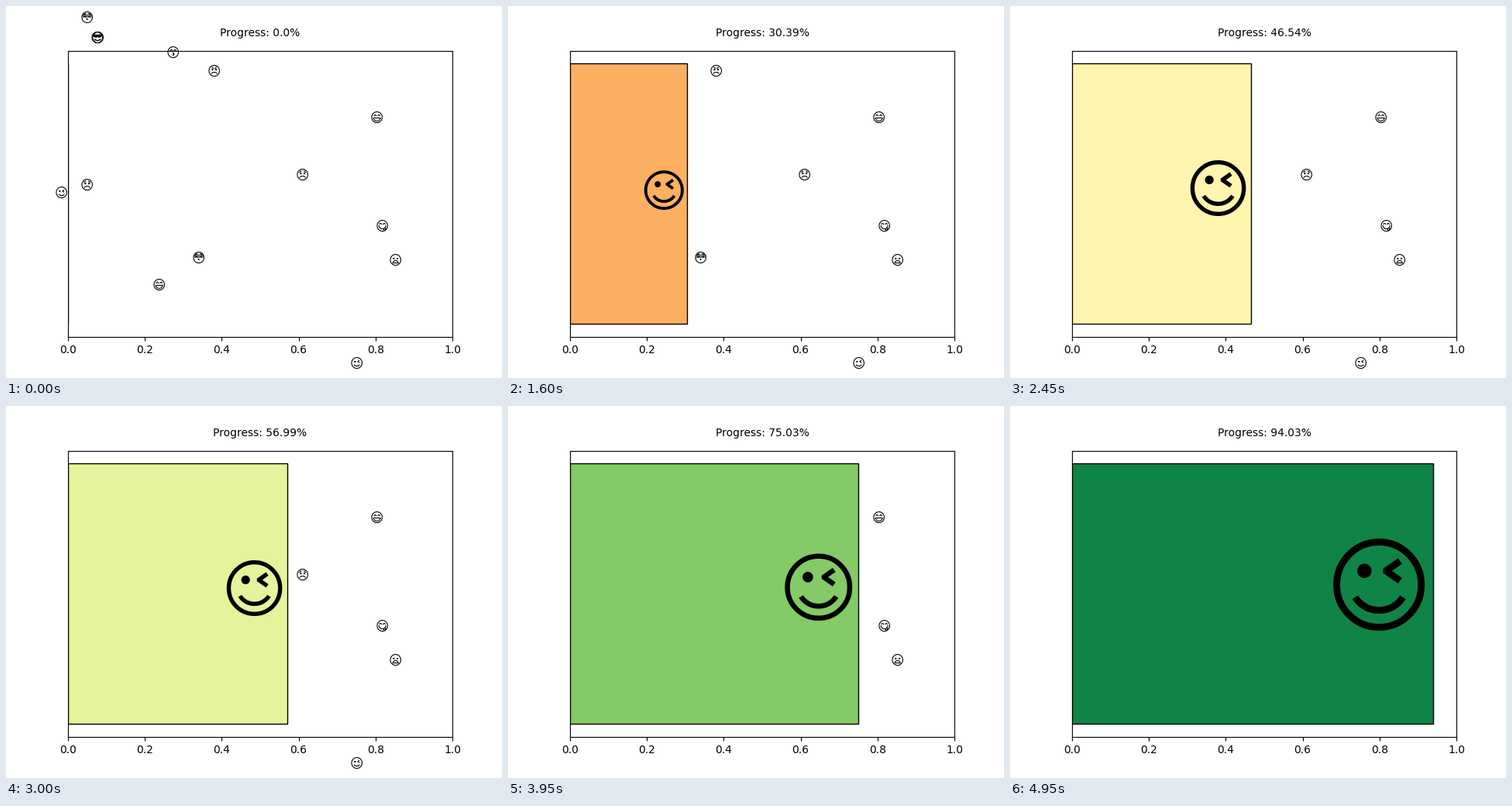
Animation, 640 px wide and 480 px high, one loop 5 s. Source, as a matplotlib script:

```python
import matplotlib.pyplot as plt
from matplotlib.animation import FuncAnimation
from matplotlib.textpath import TextPath
from matplotlib.transforms import IdentityTransform

WIDTH, HEIGHT, DPI = 640, 480, 100
FRAMES, INTERVAL = 100, 50
STEP = 0.009498          # progress gained per frame
WINK = "\U0001F609"
SMALL = 14.4             # diameter of an uneaten face, in pixels
REACH = 9.3              # a face is eaten when the bar gets this close

# face, centre x, centre y, diameter of the eater afterwards
FACES = [
    ("\U0001F633", 104, 15, 20),
    ("\U0001F61E", 104, 231, 25),
    ("\U0001F60E", 117, 41, 31),
    ("\U0001F60E", 118.4, 41, 36),
    ("\U0001F604", 197, 360, 43),
    ("\U0001F619", 215.5, 60, 51),
    ("\U0001F633", 248, 325, 61),
    ("\U0001F620", 268, 84, 71.7),
    ("\U0001F61E", 382, 218, 78),
    (WINK, 452, 461, 87),
    ("\U0001F604", 478, 144, 96),
    ("\U0001F60B", 485, 284, 106),
    ("\U0001F626", 502, 328, 118),
]

fig, ax = plt.subplots(figsize=(WIDTH / DPI, HEIGHT / DPI), dpi=DPI)
bar = ax.barh(0, 0, edgecolor="black")[0]
ax.set_xlim(0, 1)
ax.set_ylim(-0.44, 0.44)
ax.set_yticks([])
label = ax.text(0.5, 1.05, "", ha="center", transform=ax.transAxes)
cmap = plt.get_cmap("RdYlGn")

# proportions of a face relative to the font size
box = TextPath((0, 0), WINK, size=100).get_extents()
EM_WIDTH = box.width / 100
EM_MIDDLE = (box.y0 + box.y1) / 200


def font_size(diameter):
    return diameter / EM_WIDTH * 72 / DPI


SMALL_SIZE = round(font_size(SMALL))


def place(text, x, y, size):
    """Centre a face on a pixel position measured from the top left."""
    text.set_fontsize(size)
    text.set_position((x, HEIGHT - y - EM_MIDDLE * size * DPI / 72))


def make_face(char):
    return ax.text(0, 0, char, ha="center", va="baseline",
                   transform=IdentityTransform())


faces = []
for char, x, y, _ in FACES:
    face = make_face(char)
    place(face, x, y, SMALL_SIZE)
    faces.append(face)
eater = make_face(WINK)


def update(i):
    progress = i * STEP
    edge = ax.transData.transform((progress, 0))[0]
    bar.set_width(progress)
    bar.set_facecolor(cmap(progress))
    label.set_text(f"Progress: {round(progress * 100, 2)}%")

    diameter, size = SMALL, SMALL_SIZE
    for face, (_, x, _, grown) in zip(faces, FACES):
        eaten = x - REACH <= edge
        face.set_visible(not eaten)
        if eaten:
            diameter, size = grown, font_size(grown)
    place(eater, edge - 0.593 * diameter, 242.4 - 0.1 * diameter, size)
    return [bar, label, eater, *faces]


anim = FuncAnimation(fig, update, frames=FRAMES, interval=INTERVAL,
                     init_func=lambda: update(0), repeat=True)
plt.show()
```
